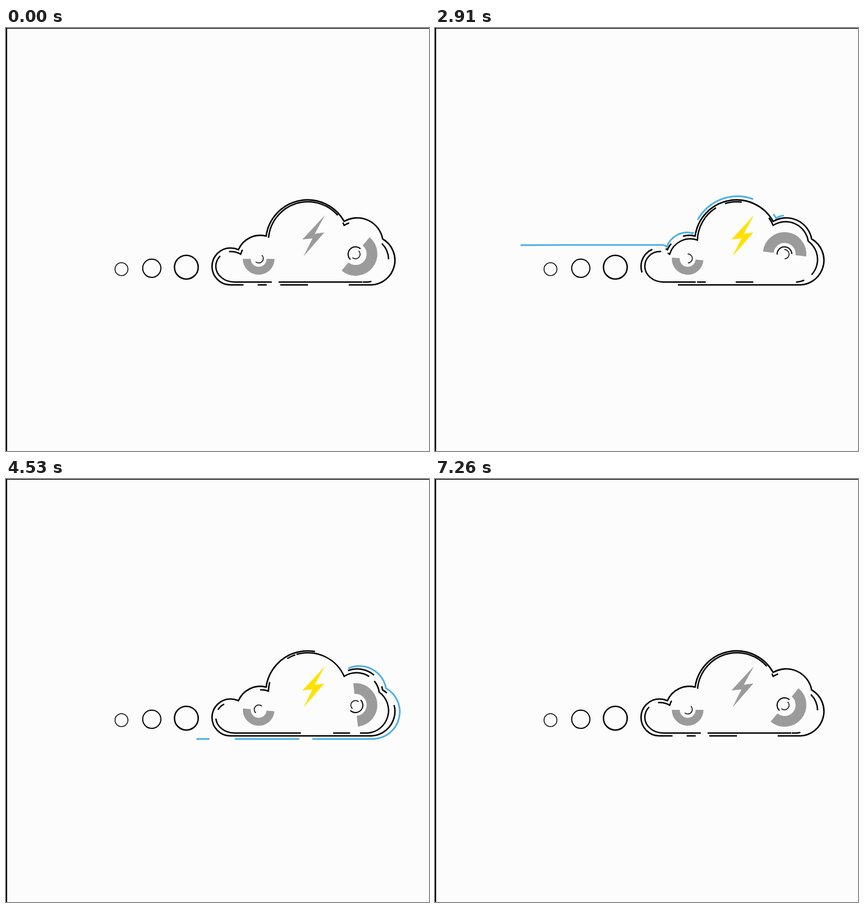
Recreate the animation shown at these times as an HTML page. Size 748 by 748 pixels, loop 7.29 s.

```html
<!DOCTYPE html>
<html lang="en">
<head>
<meta charset="utf-8">
<title>Cloud charge</title>
<style>
  html, body { margin: 0; width: 100%; height: 100%; overflow: hidden; background: #fcfcfc; }
  svg { display: block; width: 100vw; height: 100vh; }
</style>
</head>
<body>
<svg viewBox="0 0 748 748" fill="none" stroke="#000">
  <path d="M0 0H748V1.3H2V748H0Z" fill="#000" stroke="none"/>
  <circle cx="204.2" cy="426.4" r="11.4" stroke-width="1.5"/>
  <circle cx="257.8" cy="424.8" r="16.1" stroke-width="2"/>
  <circle cx="318.9" cy="422.9" r="21" stroke-width="2.5"/>

  <g id="gauges"></g>
  <polygon id="bolt" stroke="none" points="564,331 524,374 542,372 526,404 563,361.5 546,364"/>

  <path id="outer" stroke-width="2.6" d="M534 454.3H397A32.7 32.7 0 0 1 364.3 421.6A32.7 32.7 0 0 1 397 389
    Q404.5 389 411 392A42 42 0 0 1 460 368A74 74 0 0 1 598 342A45.7 45.7 0 0 1 666 373
    A43.6 43.6 0 0 1 646 454.3Z"/>
  <path id="inner" stroke-width="2.5" d="M630 449.2H404A33 28 0 0 1 371 421.5A26.5 26.5 0 0 1 397.5 395.3
    Q407 395.3 415 400A38 38 0 0 1 464 375A70 70 0 0 1 598 349A40.5 40.5 0 0 1 660 377
    A40 40 0 0 1 640 449.2Z"/>
  <path id="wire" stroke="#49aee8" stroke-width="2.9" d="M0 384.5L268 383.6H402Q407 384 410 387
    A38 38 0 0 1 456 363A80 80 0 0 1 603 336A48 48 0 0 1 672 370A48 48 0 0 1 650 459.7H0"/>
</svg>
<script>
const LOOP = 7290;
const WIRE = { start: 773, duration: 6485 };
const CLOUD = { start: 2035, duration: 4000 };
const GRAY = '#9b9b9b', YELLOW = '#ffe100';
const byId = id => document.getElementById(id);
const sum = list => list.reduce((a, b) => a + b, 0);
const progress = (t, { start, duration }) => Math.min(1, Math.max(0, (t - start) / duration));

// Half rings; angles are clockwise from the right.
function halfRing(cx, cy, r, width, color, angleAt) {
  const ring = document.createElementNS('http://www.w3.org/2000/svg', 'path');
  ring.setAttribute('d', `M${cx + r} ${cy}A${r} ${r} 0 0 1 ${cx - r} ${cy}`);
  ring.setAttribute('stroke', color);
  ring.setAttribute('stroke-width', width);
  byId('gauges').append(ring);
  return p => ring.setAttribute('transform', `rotate(${angleAt(p)} ${cx} ${cy})`);
}
const spin = (from, turns) => p => from + 360 * turns * p;

const SWINGS = [[0, 0], [0.0612, 35], [0.376, -25], [0.624, 5], [0.841, 15], [1, 0]];
function swing(p) {
  const i = Math.max(1, SWINGS.findIndex(([at]) => at >= p));
  const [t0, a] = SWINGS[i - 1], [t1, b] = SWINGS[i];
  const k = (1 - Math.cos(Math.PI * (p - t0) / (t1 - t0))) / 2;
  return a + (b - a) * k;
}

const rings = [
  halfRing(446.8, 408.3, 21, 14, GRAY, swing),
  halfRing(618.2, 399.6, 29, 19, GRAY, spin(-50, 3)),
  halfRing(447, 407.6, 8, 1.5, '#000', spin(-47, 4)),
  halfRing(618, 400, 8.2, 1.5, '#000', spin(-47, 4)),
  halfRing(618, 400, 13, 2, '#000', spin(133, -4))
];

// Dashes run once around a closed outline; the entry 0 takes up the remaining length.
function runner(id, dashes) {
  const path = byId(id), length = path.getTotalLength();
  const rest = length - sum(dashes);
  path.setAttribute('stroke-dasharray', dashes.map(d => d || rest).join(' '));
  return p => path.setAttribute('stroke-dashoffset', -length * (p % 1));
}
const outlines = [
  runner('outer', [49, 24, 16, 25, 0, 73]),
  runner('inner', [148, 12, 134, 17.5, 30, 57, 163, 16, 15, 77, 31, 53, 15.5, 0])
];

const wire = byId('wire'), pulse = [319, 23, 114, 45, 23];
const pulseLength = sum(pulse), wireTravel = wire.getTotalLength() + pulseLength;
wire.setAttribute('stroke-dasharray', [...pulse, 4000].join(' '));

function render(t) {
  const w = progress(t, WIRE), p = progress(t, CLOUD);
  wire.setAttribute('stroke-dashoffset', pulseLength - wireTravel * w);
  wire.style.visibility = w > 0 && w < 1 ? 'visible' : 'hidden';
  [...rings, ...outlines].forEach(update => update(p));
  byId('bolt').setAttribute('fill', p > 0 && p < 1 ? YELLOW : GRAY);
}

const begin = performance.now();
function tick() {
  render((performance.now() - begin) % LOOP);
  requestAnimationFrame(tick);
}
tick();
</script>
</body>
</html>
```
